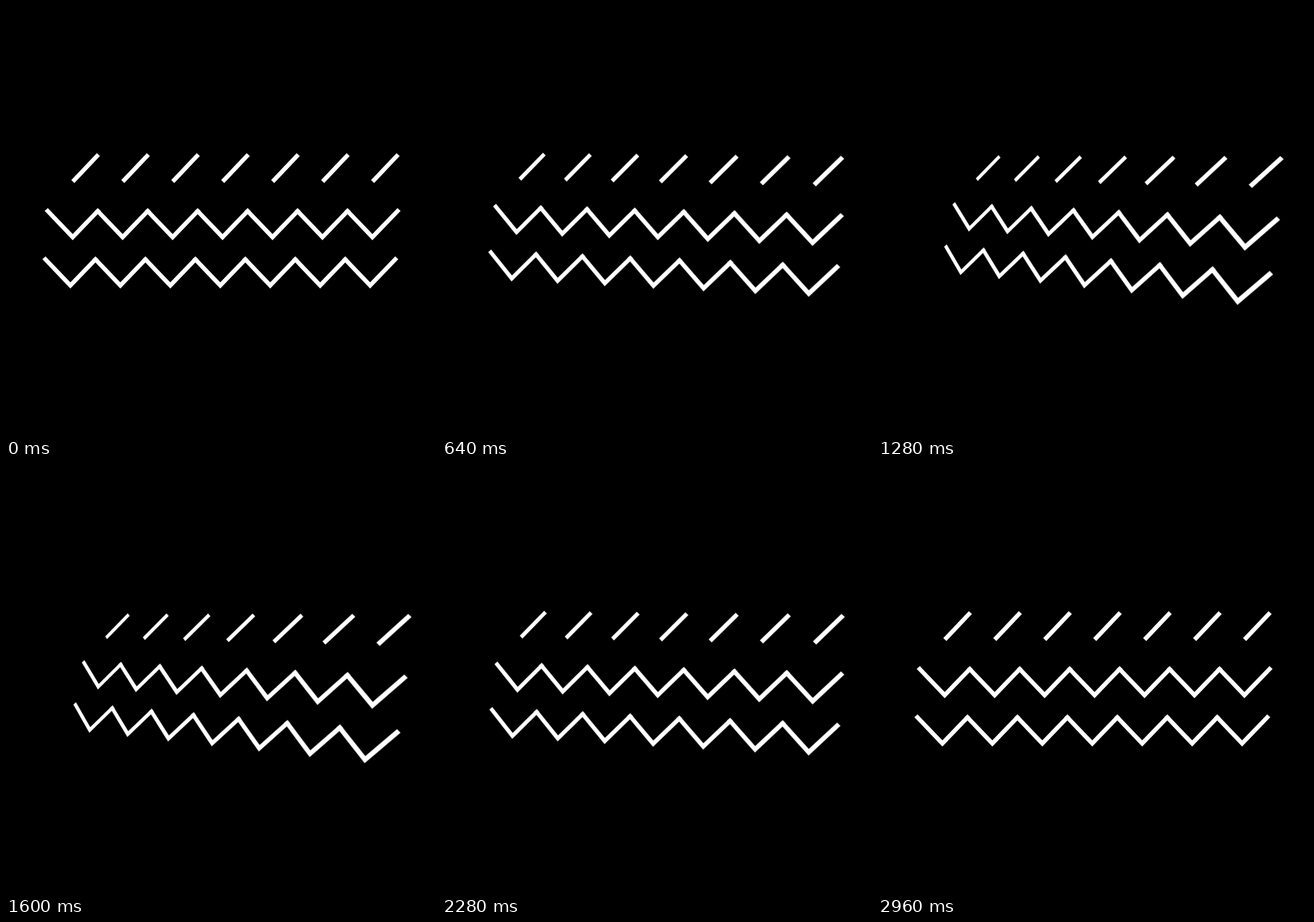
Recreate the animation shown at these times as an HTML page. Size 748x748 px, loop 3 s.

```html
<!DOCTYPE html>
<html lang="en">
<head>
<meta charset="utf-8">
<title>Tilting waves</title>
<style>
  html, body {
    margin: 0;
    width: 100%;
    height: 100%;
    overflow: hidden;
    background: #000;
  }
  .stage {
    position: relative;
    width: 748px;
    height: 748px;
    overflow: hidden;
    perspective: 1039px;
  }
  .waves {
    display: block;
    width: 748px;
    height: 748px;
    fill: none;
    stroke: #fff;
    stroke-width: 7.5;
    stroke-miterlimit: 10;
    animation: tilt 3000ms cubic-bezier(.333, 0, .667, 1) infinite;
  }
  /* Swing out and back, then rest for the last 40 ms */
  @keyframes tilt {
    0%, 98.667%, 100% { transform: rotate3d(.356, -.916, .187, 0deg); }
    49.333% { transform: rotate3d(.356, -.916, .187, 28.3deg); }
  }
</style>
</head>
<body>
<div class="stage">
  <svg class="waves" viewBox="0 0 748 748">
    <path id="waves"/>
  </svg>
</div>
<script>
  const COUNT = 7, STEP = 86.9;

  // One shape repeated along a row
  const row = (x, y, shape) =>
    Array.from({ length: COUNT }, (_, i) => `M${x + i * STEP} ${y}${shape}`).join('');

  const dash = 'l44.4 -46.8';
  const vee = 'l46 48 46.3 -48';

  document.getElementById('waves').setAttribute('d',
    row(116.3, 305.3, dash) + row(70, 354, vee) + row(66, 438, vee));
</script>
</body>
</html>
```
